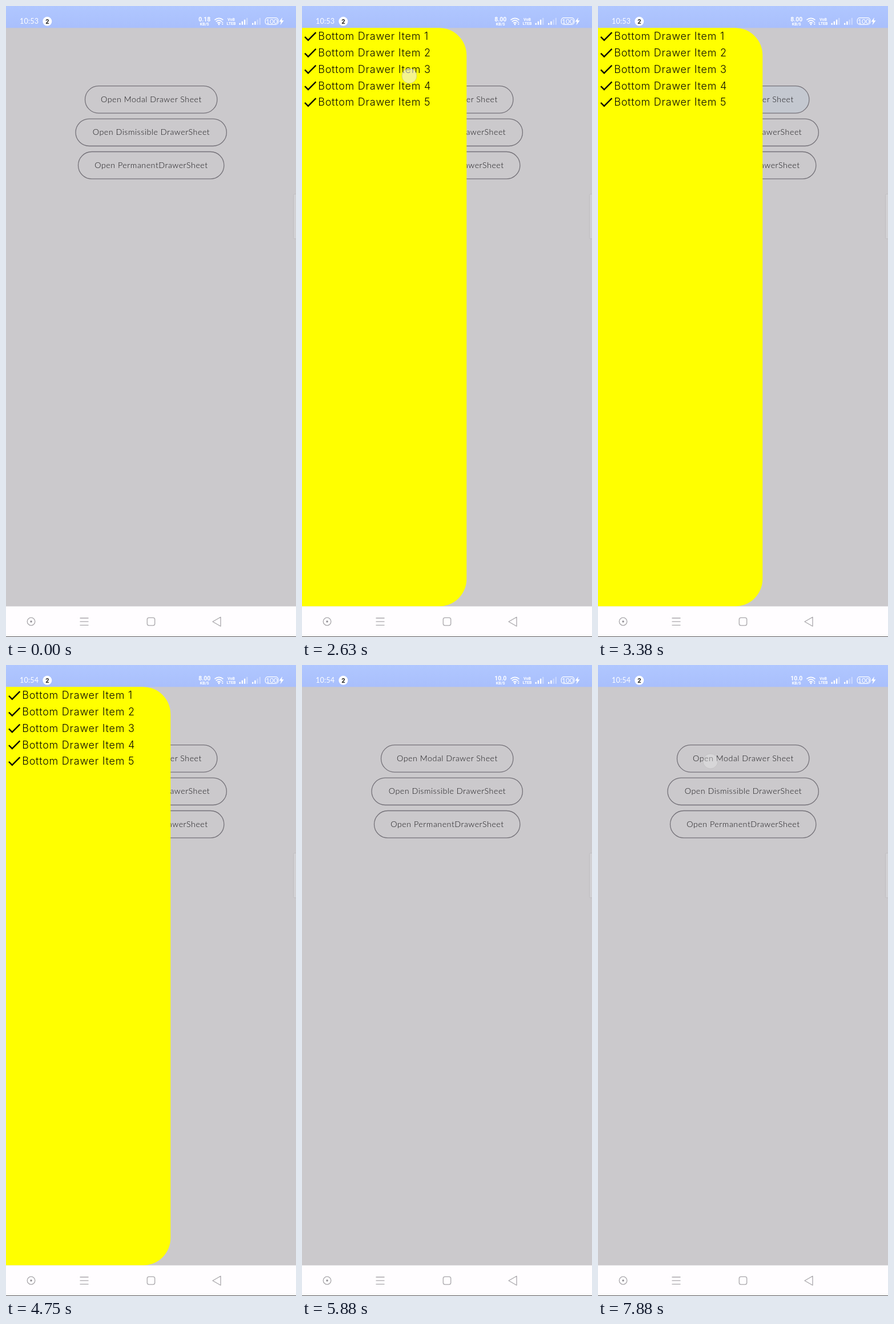
Animation of 508x1102 px, one loop 8 s. Source, as an HTML page:

```html
<!DOCTYPE html>
<html lang="en">
<head>
<meta charset="utf-8">
<title>Drawer sheets</title>
<style>
html, body { margin: 0; width: 100%; height: 100%; overflow: hidden; background: #cbc9cc; }
svg { display: block; width: 100%; height: 100%; }
.hand { font: 300 14.3px Lato, sans-serif; letter-spacing: .5px; }
.clock { font: 12.6px Lato, sans-serif; letter-spacing: .2px; }
.label { fill: #161518; text-anchor: middle; }
.item { font: 300 18px Inter, sans-serif; letter-spacing: .75px; }
.bold { font-family: Roboto, sans-serif; font-weight: 700; text-anchor: middle; }
.outline { fill: none; stroke: #757279; stroke-width: 1.3; }
.ripple { fill: #c3c8d2; }
.nav { fill: none; stroke: #a9a7ab; stroke-width: 1.3; stroke-linejoin: round; }

/* One loop is 64 ticks of 125 ms; every change is a hard cut. */
.anim { opacity: 0; animation: 8s step-end infinite; }
.modal { animation-name: modal; }
.dismissible { animation-name: dismissible; }
.ripple1 { animation-name: ripple1; }
.ripple2 { animation-name: ripple2; }
.early { animation-name: early; }
.late { animation-name: late; }
.speed1 { animation-name: speed1; }
.speed2 { animation-name: speed2; }
.speed3 { animation-name: speed3; }
.touch { animation-name: touch; }

@keyframes modal {
  0%, 34.375%, 71.875% { opacity: 0; }
  20.3125%, 40.625% { opacity: 1; }
}
@keyframes dismissible {
  0%, 98.4375% { opacity: 0; }
  87.5% { opacity: 1; }
}
@keyframes ripple1 {
  0%, 25%, 45.3125% { opacity: 0; }
  18.75%, 40.625% { opacity: .6; }
  20.3125% { opacity: 1; }
  21.875%, 42.1875% { opacity: .8; }
  23.4375%, 43.75% { opacity: .4; }
}
@keyframes ripple2 {
  0%, 92.1875% { opacity: 0; }
  87.5% { opacity: .6; }
  89.0625% { opacity: 1; }
  90.625% { opacity: .5; }
}
@keyframes early { 0% { opacity: 1; } 46.875% { opacity: 0; } }
@keyframes late { 0% { opacity: 0; } 46.875% { opacity: 1; } }
@keyframes speed1 { 0% { opacity: 1; } 12.5% { opacity: 0; } }
@keyframes speed2 { 0%, 64.0625% { opacity: 0; } 12.5% { opacity: 1; } }
@keyframes speed3 { 0% { opacity: 0; } 64.0625% { opacity: 1; } }
@keyframes touch {
  0%, 20.3125%, 35.9375%, 42.1875%, 59.375%, 64.0625%, 68.75%, 73.4375%, 89.0625% { opacity: 0; }
  17.1875% { opacity: 1; transform: translate(228px, 165px); }
  18.75% { opacity: .6; transform: translate(228px, 165px); }
  32.8125% { opacity: 1; transform: translate(188px, 122px); }
  34.375% { opacity: .6; transform: translate(188px, 122px); }
  39.0625% { opacity: 1; transform: translate(232px, 165px); }
  40.625% { opacity: .6; transform: translate(232px, 165px); }
  50% { opacity: 1; transform: translate(392px, 714px); }
  51.5625% { opacity: .6; transform: translate(392px, 714px); }
  53.125% { opacity: 1; transform: translate(405px, 440px); }
  54.6875% { opacity: .6; transform: translate(405px, 440px); }
  56.25% { opacity: 1; transform: translate(345px, 172px); }
  57.8125% { opacity: .6; transform: translate(345px, 172px); }
  60.9375% { opacity: 1; transform: translate(77px, 431px); }
  62.5% { opacity: .6; transform: translate(77px, 431px); }
  65.625% { opacity: 1; transform: translate(170px, 300px); }
  67.1875% { opacity: .6; transform: translate(170px, 300px); }
  70.3125% { opacity: 1; transform: translate(190px, 125px); }
  71.875% { opacity: .6; transform: translate(190px, 125px); }
  85.9375% { opacity: 1; transform: translate(225px, 222px); }
  87.5% { opacity: .6; transform: translate(225px, 222px); }
  96.875% { opacity: 1; transform: translate(197px, 168px); }
  98.4375% { opacity: .6; transform: translate(197px, 168px); }
}
</style>
</head>
<body>
<svg viewBox="0 0 508 1102" preserveAspectRatio="none">
  <defs>
    <linearGradient id="sky" x2="0" y2="1">
      <stop offset="0" stop-color="#b0c7ff"/>
      <stop offset="1" stop-color="#a9bffc"/>
    </linearGradient>
    <g id="rows"></g>
  </defs>

  <rect width="508" height="1102" fill="#cbc9cc"/>
  <g id="buttons"></g>
  <rect x="503.5" y="328.5" width="8" height="78" rx="2" fill="#d1d0d3" stroke="#bfbdc0"/>

  <rect width="508" height="38.3" fill="url(#sky)"/>

  <g class="anim modal">
    <path d="M0 38.2H240.3a48 48 0 0 1 48 48V1000.5a48 48 0 0 1-48 48H0z" fill="#ff0"/>
    <use href="#rows" fill="#0b0b05"/>
  </g>
  <g class="anim dismissible">
    <rect y="38.2" width="288.3" height="1010.3" fill="#fef9fe"/>
    <use href="#rows" fill="#1c1b1f"/>
  </g>

  <g fill="#fff">
    <g class="clock">
      <text class="anim early" x="24" y="31">10:53</text>
      <text class="anim late" x="24" y="31">10:54</text>
    </g>
    <circle cx="72.3" cy="26.8" r="8"/>
    <text class="bold" x="72.3" y="30.8" font-size="11" fill="#222">2</text>
    <g class="bold" font-size="10.5">
      <text class="anim speed1" x="347.7" y="26.8">0.18</text>
      <text class="anim speed2" x="347.7" y="26.8">8.00</text>
      <text class="anim speed3" x="347.7" y="26.8">10.0</text>
    </g>
    <g class="bold" font-size="7">
      <text x="347.7" y="34">KB/S</text>
      <text x="394.5" y="26">VoB</text>
      <text x="394.5" y="32.8">LTEB</text>
    </g>
    <g fill="none" stroke="#fff" stroke-width="1.7">
      <path d="M365.5 24.3q7.5-6 15 0M367.8 27.3q5.2-4.2 10.4 0M370.2 30q2.8-2.2 5.6 0"/>
      <rect x="454.2" y="20.6" width="22.6" height="11.8" rx="4.5" stroke-width="1.2"/>
    </g>
    <circle cx="373" cy="32" r="1.4"/>
    <path d="M377.5 29.5l1.7-2 1.7 2zM377.5 31l1.7 2 1.7-2z"/>
    <g id="signal"></g>
    <text x="465.5" y="31" font-size="12" text-anchor="middle" font-family="Lato, sans-serif">100</text>
    <path d="M484 20l-5.5 7.5h3.4l-1.5 6 6.2-8.2h-3.6z"/>
  </g>

  <rect y="1048.5" width="508" height="54" fill="#fffdff"/>
  <g class="nav">
    <circle cx="44" cy="1075" r="6.8"/>
    <path d="M129.5 1069h15M129.5 1075.2h15M129.5 1081.4h15M362 1075.2l14-8v16z"/>
    <rect x="247.3" y="1068.4" width="13.4" height="13.4" rx="3"/>
  </g>
  <circle cx="44" cy="1075" r="1.7" fill="#8f8d91"/>
  <rect y="1101" width="508" height="1" fill="#58575a"/>

  <circle class="anim touch" r="13" fill="rgba(236,236,236,.6)" stroke="rgba(155,155,155,.4)"/>
</svg>
<script>
const fill = (id, parts) => {
  document.getElementById(id).innerHTML = parts.join('');
};

const buttons = [
  ['Open Modal Drawer Sheet', 231.4, 'ripple1'],
  ['Open Dismissible DrawerSheet', 264.4, 'ripple2'],
  ['Open PermanentDrawerSheet', 255.4, '']
];
fill('buttons', buttons.map(([label, width, ripple], i) => {
  const y = 139.7 + i * 57.4;
  const box = `x="${254.2 - width / 2}" y="${y}" width="${width}" height="47.4" rx="23.7"`;
  return (ripple && `<rect class="anim ripple ${ripple}" ${box}/>`) +
    `<rect class="outline" ${box}/>` +
    `<text class="hand label" x="254.5" y="${y + 28}">${label}</text>`;
}));

fill('rows', [1, 2, 3, 4, 5].map(n => `
  <g transform="translate(0 ${38.6 + (n - 1) * 28.75})">
    <path transform="scale(1.2)" d="M9 16.17L4.83 12l-1.42 1.41L9 19 21 7l-1.41-1.41z"/>
    <text class="item" x="28.2" y="20.7">Bottom Drawer Item ${n}</text>
  </g>`));

// Two signal meters, with three and two of four bars lit.
fill('signal', [[408.5, 3], [431, 2]].flatMap(([x, lit]) =>
  [3, 6, 9, 12].map((h, i) =>
    `<rect x="${x + i * 4.2}" y="${32.8 - h}" width="2.4" height="${h}" opacity="${i < lit ? 1 : .35}"/>`)));
</script>
</body>
</html>
```
